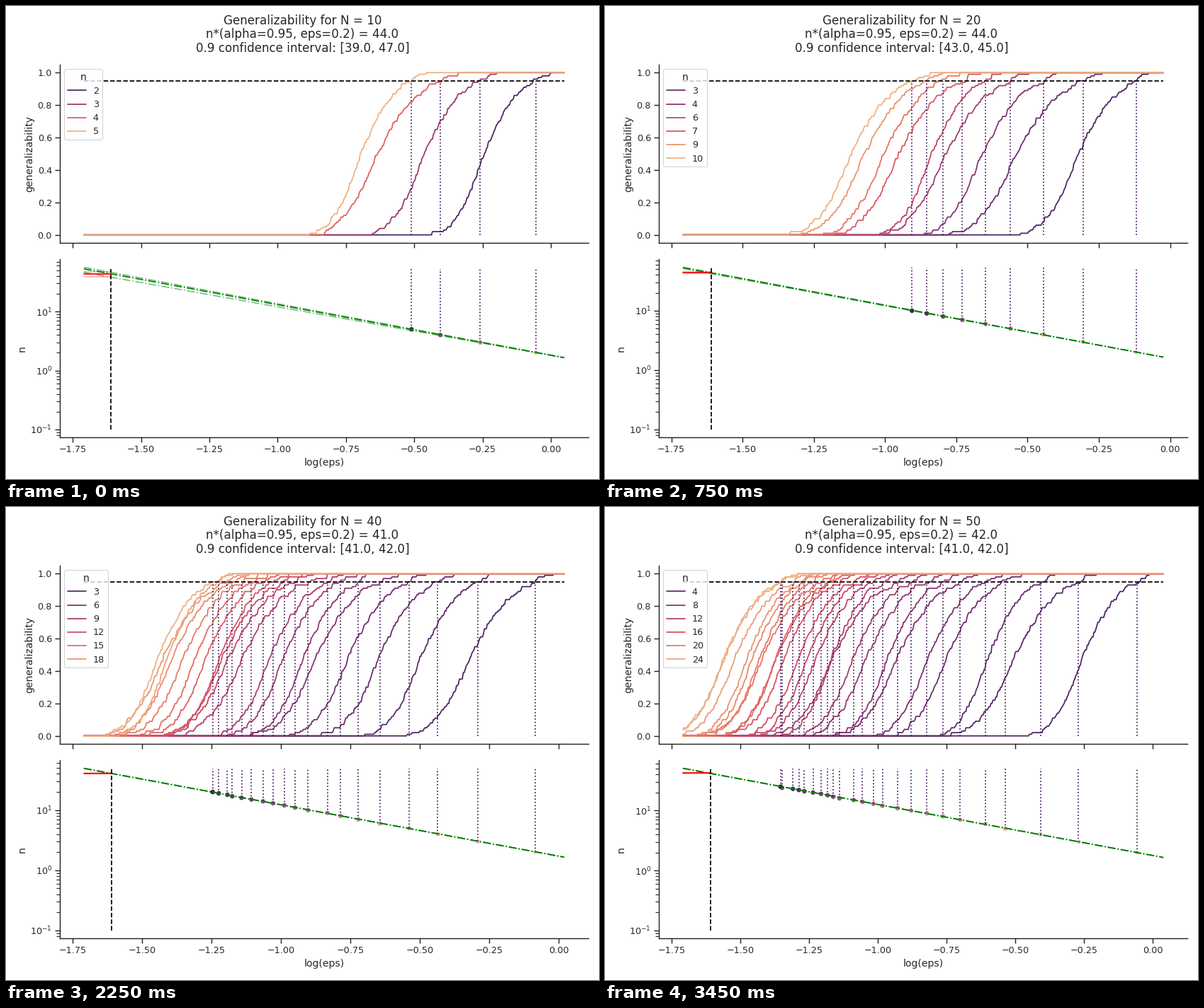
Animation of 837 by 669 pixels, one loop 3750 ms. Source, as a matplotlib script:

```python
import numpy as np
import matplotlib.pyplot as plt
from matplotlib.animation import FuncAnimation
from matplotlib.colors import LinearSegmentedColormap
from matplotlib.ticker import MaxNLocator

W, H, DPI = 837, 669, 83.7
INK = "0.15"
plt.rcParams.update({
    "font.family": "DejaVu Sans", "font.size": 12,
    "axes.labelsize": 12, "axes.linewidth": 1.25,
    "axes.edgecolor": INK, "axes.labelcolor": INK, "text.color": INK,
    "axes.spines.top": False, "axes.spines.right": False,
    "xtick.labelsize": 11, "ytick.labelsize": 11,
    "xtick.color": INK, "ytick.color": INK,
    "xtick.major.size": 6, "ytick.major.size": 6, "ytick.minor.size": 4,
    "xtick.major.width": 1.25, "ytick.major.width": 1.25,
    "ytick.minor.width": 1, "lines.linewidth": 1.5,
    "lines.solid_capstyle": "round",
    "legend.fontsize": 11, "legend.title_fontsize": 12,
})

FLARE = LinearSegmentedColormap.from_list("flare", [
    "#4b2362", "#6c2b6d", "#8f3371", "#b13c6c",
    "#d14a61", "#e3685c", "#e98d6b", "#edb081"])
DARK = "#4b1d62"

X_LEFT = -1.7093
X_EPS = np.log(0.2)
N_MIN, Y_MIN = 2, 0.1
ALPHA = 0.95

# The fitted line runs from START * best at the left to TAIL at the right
START, TAIL = 1.207, 1.65

# Rise of a curve: levels and their distance in log(eps) from ALPHA
LEVELS = np.array([.01, .1, .5, .8, ALPHA, 1])
OFFSETS = np.array([-.42, -.33, -.21, -.11, 0, .06])

# N, n*, confidence interval, largest log(eps)
SCENES = [
    (10, 44, (39, 47), .0496),
    (20, 44, (43, 45), -.0234),
    (30, 47, (46, 48), .018),
    (40, 41, (41, 42), .0194),
    (50, 42, (41, 42), .039),
]


def cubehelix(t):
    """Light pink at t = 0 to dark violet at t = 1."""
    x = .85 - .7 * t
    amp = .8 * x * (1 - x) / 2
    phi = 2 * np.pi * .4 * x
    c, s = np.cos(phi), np.sin(phi)
    rgb = (x + amp * (-.14861 * c + 1.78277 * s),
           x + amp * (-.29227 * c - .90649 * s),
           x + amp * 1.97294 * c)
    return tuple(np.clip(rgb, 0, 1))


def logit(p):
    p = np.clip(p, .003, .995)
    return np.log(p / (1 - p))


def staircase(mark, xs, rng):
    """Share of 100 jittered samples at or below each x; ALPHA at the mark."""
    p = np.sort(np.arange(1, 101) + rng.uniform(-1.8, 1.8, 100)) / 100
    knots = mark + OFFSETS * rng.uniform(.87, 1.13)
    samples = np.interp(logit(p), logit(LEVELS), knots)
    return np.searchsorted(samples, xs, side="right") / 100


def draw_curves(ax, xs, ns, marks, shade, rng):
    for n, mark in zip(ns, marks):
        ax.plot(xs, staircase(mark, xs, rng), color=FLARE(shade(n)))
    ax.plot(xs[[0, -1]], [ALPHA, ALPHA], "k--")
    for x in marks:
        ax.plot([x, x], [0, ALPHA], ":", color=DARK)

    keys = MaxNLocator(nbins=6).tick_values(ns[0], ns[-1]).astype(int)
    handles = [plt.Line2D([], [], color=FLARE(shade(k)), label=str(k))
               for k in np.unique(keys) if ns[0] <= k <= ns[-1]]
    ax.legend(handles=handles, title="n", loc="upper left",
              labelspacing=.48, borderpad=.36)
    ax.set_ylabel("generalizability")
    ax.tick_params(labelbottom=False)
    ax.set_ylim(-.05, 1.05)


def draw_fit(ax, xs, ns, marks, shade, best, ci, spread):
    main = START * best
    low, high = main * (1 - 2 * spread), main * (1 + spread)
    ax.set_yscale("log")
    ax.scatter(marks, ns, s=36, c=[cubehelix(shade(n)) for n in ns],
               edgecolors="white", linewidths=.48)
    for x, n in zip(marks, ns):
        ax.plot([x, x], [n, main], ":", color=DARK)

    for start, opacity in ((main, 1), (low, .5), (high, .5)):
        ax.plot(xs[[0, -1]], [start, TAIL], "-.", color="green",
                alpha=opacity)
    for value, opacity in ((best, 1), (ci[0], .3), (ci[1], .3)):
        ax.plot([X_LEFT, X_EPS], [value, value], color="red", alpha=opacity)
    ax.plot([X_EPS, X_EPS], [Y_MIN, main], "k--")

    pad = (high / Y_MIN) ** .05
    ax.set_ylim(Y_MIN / pad, high * pad)
    ax.set_xlabel("log(eps)")
    ax.set_ylabel("n")


# The hair added to each side keeps rounding from losing a pixel
fig = plt.figure(figsize=((W + .01) / DPI, (H + .01) / DPI), dpi=DPI,
                 facecolor="white")
top, bottom = (fig.add_axes([76 / W, 1 - base / H, 746 / W, 252.4 / H])
               for base in (335.2, 610.4))
title = fig.suptitle("", fontsize=14.4, y=.982, linespacing=1.09)


def update(i):
    size, best, ci, right = SCENES[i]
    rng = np.random.default_rng(size)
    xs = np.linspace(X_LEFT, right, 500)
    ns = np.arange(N_MIN, size // 2 + 1)

    # Marks scatter slightly around the fitted line
    start = START * best
    share = np.log(start / ns) / np.log(start / TAIL)
    marks = X_LEFT + share * (right - X_LEFT) + rng.normal(0, .007, len(ns))

    def shade(n):
        return float((n - ns[0]) / (ns[-1] - ns[0]))

    top.clear()
    bottom.clear()
    draw_curves(top, xs, ns, marks, shade, rng)
    draw_fit(bottom, xs, ns, marks, shade, best, ci, 6.5 / size ** 2)
    margin = .05 * (right - X_LEFT)
    for ax in (top, bottom):
        ax.set_xticks(np.arange(-1.75, .01, .25))
        ax.set_xlim(X_LEFT - margin, right + margin)

    title.set_text(f"Generalizability for N = {size}\n"
                   f"n*(alpha={ALPHA}, eps=0.2) = {best:.1f}\n"
                   f"0.9 confidence interval: [{ci[0]:.1f}, {ci[1]:.1f}]")
    return []


anim = FuncAnimation(fig, update, frames=len(SCENES), interval=750,
                     repeat=True, repeat_delay=0)
plt.show()
```
